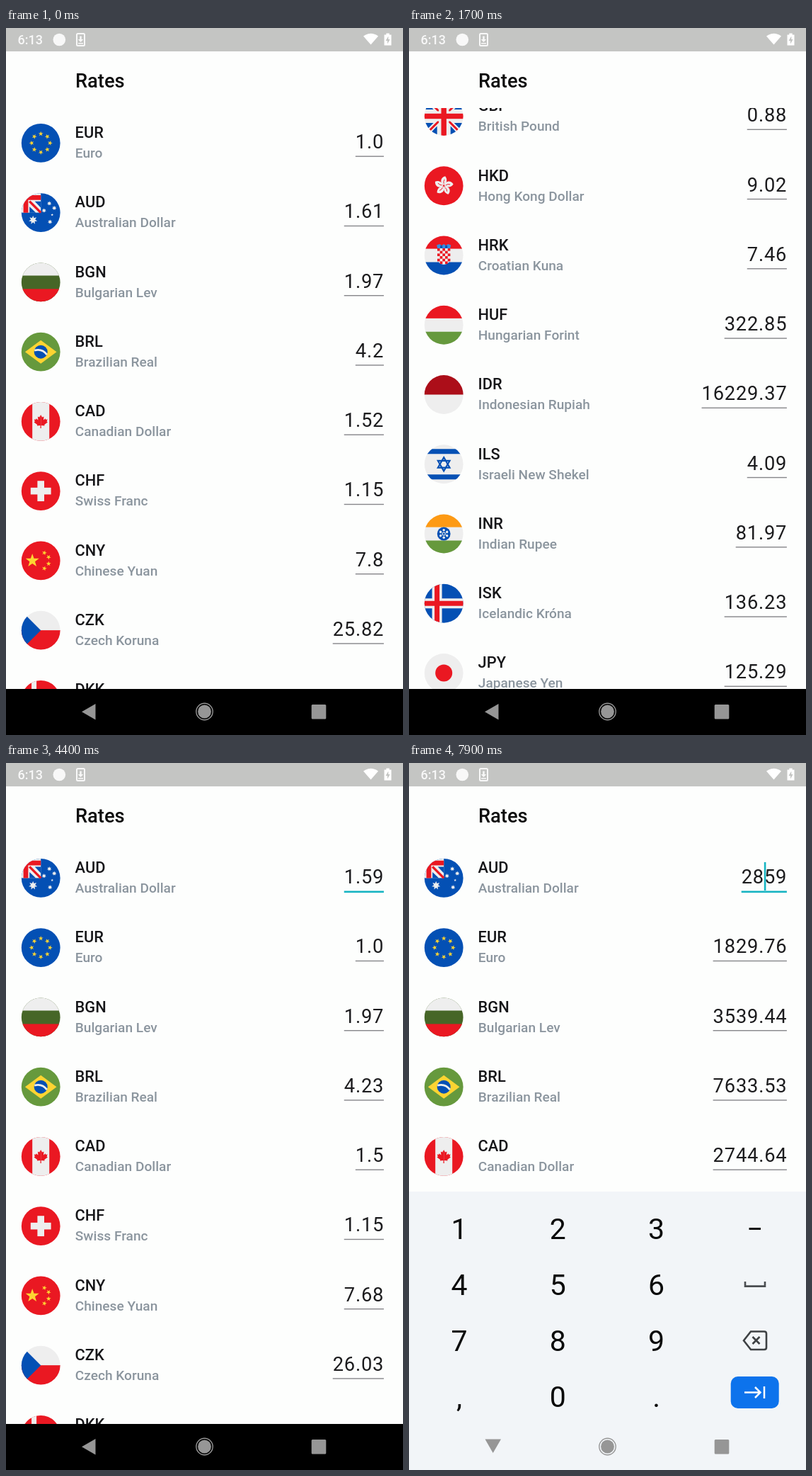
Recreate the animation shown at these times as an HTML page. Size 561 px wide and 998 px high, loop 8000 ms.

```html
<!DOCTYPE html>
<html lang="en">
<head>
<meta charset="utf-8">
<title>Rates</title>
<style>
  html, body { margin: 0; width: 100%; height: 100%; overflow: hidden; background: #fdfefd; }
  svg { display: block; width: 561px; height: 998px; font-family: Roboto, sans-serif; }
  .title { font-size: 27.3px; font-weight: 500; fill: #0c0c0c; }
  .code { font-size: 21.8px; font-weight: 500; fill: #161619; }
  .name { font-size: 19.1px; font-weight: 500; fill: #8b959e; }
  .value { font-size: 27.27px; letter-spacing: .03em; fill: #1c1c1e; }
  .clock { font-size: 18px; font-weight: 500; fill: #f8f8f8; }
  .key { font-size: 41px; text-anchor: middle; fill: #0a0a0a; }
</style>
</head>
<body>
<svg id="stage" viewBox="0 0 561 998"></svg>
<script>
const LOOP = 8000, STEP = 100;
const PITCH = 98.25, FIRST = 162.4, RIGHT = 533.9;
const RED = '#ea1822', BLUE = '#0450b4', WHITE = '#eeeeee', YELLOW = '#fdd432', GREEN = '#66993d';

// Flag helpers: each flag is drawn around 0,0 and clipped to a disc of radius 27.4.
const rect = (x, y, w, h, c) => `<rect x="${x}" y="${y}" width="${w}" height="${h}" fill="${c}"/>`;
const circle = (x, y, r, c) => `<circle cx="${x}" cy="${y}" r="${r}" fill="${c}"/>`;
const path = (d, c, more = '') => `<path d="${d}" fill="${c}" ${more}/>`;
const line = (d, c, w) => path(d, 'none', `stroke="${c}" stroke-width="${w}"`);
const fill = c => rect(-28, -28, 56, 56, c);
const bands = (a, b, c) => fill(b) + rect(-28, -28, 56, 18.6, a) + rect(-28, 9.5, 56, 19, c);
const cross = (x, half, c) => rect(x - half, -28, half * 2, 56, c) + rect(-28, -half, 56, half * 2, c);
const spin = (n, draw) => Array.from({ length: n }, (_, i) =>
  `<g transform="rotate(${i * 360 / n})">${draw(i)}</g>`).join('');

function star(x, y, r, c, points = 5, inner = .4, turn = 0) {
  const pts = [];
  for (let i = 0; i < points * 2; i++) {
    const a = (i / points - .5) * Math.PI + turn, k = i % 2 ? r * inner : r;
    pts.push((x + k * Math.cos(a)).toFixed(2) + ',' + (y + k * Math.sin(a)).toFixed(2));
  }
  return `<polygon points="${pts.join(' ')}" fill="${c}"/>`;
}

function leaf() {
  const half = path('M0-9.5 2.1-5.8 4.3-7 3.8-2 6.4-4.2 7-2.6 9.4-3 8.4 0 9.7 1 5 4.6 5.4 6.2.7 5.7V9.5H0Z', RED);
  return half + `<g transform="scale(-1 1)">${half}</g>`;
}

function shield() {
  let s = path('M-9.2-10H9.2V4A9.2 9 0 0 1-9.2 4Z', WHITE);
  for (let r = 0; r < 6; r++)
    for (let c = 0; c < 5; c++)
      if ((r + c) % 2 === 0 && !(r > 4 && c % 4 === 0))
        s += rect(-9.2 + c * 3.68, -10 + r * 3.68, 3.68, 3.68, RED);
  return s + path('M-9-10-10-14.5-6-16-3-14 0-16 3-14 6-16 10-14.5 9-10Z', '#3a8fe0') +
    rect(-5, -14, 3, 4, BLUE) + rect(2, -14, 3, 4, BLUE);
}

const jack = fill(WHITE) +
  spin(2, () => path('M-9.5-28V-14L-23-28ZM9.5-28V-14L23-28ZM-28-9.5H-14.5L-28-23ZM28-9.5H14.5L28-23Z', BLUE) +
    line('M-7-7-22-22M7-7 22-22', RED, 3)) + cross(0, 7, WHITE) + cross(0, 3.7, RED);

const canton = rect(-28, -28, 28, 28, WHITE) +
  path('M0-16V-7L-8.5-16ZM-16 0H-7L-16-8.5Z', BLUE) + line('M-16-16 0 0', RED, 3.4) +
  path('M-28-24.6H0V-17.8H-17.8V0H-24.6V-28Z', RED);

const trigram = i => [-17, -14, -11].map(y =>
  i === 0 ? rect(-4.6, y - 2.5, 9.2, 1.9, '#111')
    : rect(-4.6, y - 2.5, 4.1, 1.9, '#111') + rect(.5, y - 2.5, 4.1, 1.9, '#111')).join('');

const rows = [
  ['EUR', 'Euro', fill(BLUE) + spin(8, () => star(0, -13, 3.6, YELLOW))],
  ['AUD', 'Australian Dollar', fill(BLUE) + canton + star(-11, 10.5, 6.2, WHITE, 7, .5) +
    star(12, -13, 3.3, WHITE, 7, .5) + star(4.5, -3, 3.3, WHITE, 7, .5) + star(19, -6.5, 3.3, WHITE, 7, .5) +
    star(13, 13, 3.3, WHITE, 7, .5) + star(16, 3, 2, WHITE)],
  ['BGN', 'Bulgarian Lev', bands(WHITE, '#466627', RED)],
  ['BRL', 'Brazilian Real', fill(GREEN) + path('M-22.3 0 0-16.5 22.3 0 0 16.5Z', YELLOW) +
    circle(0, 0, 9.5, BLUE) + line('M-9-2Q2-5 8.6 4', WHITE, 2.8)],
  ['CAD', 'Canadian Dollar', fill(RED) + rect(-12, -28, 24, 56, WHITE) + leaf()],
  ['CHF', 'Swiss Franc', fill(RED) + rect(-14.4, -4.8, 28.8, 9.6, WHITE) + rect(-4.8, -14.4, 9.6, 28.8, WHITE)],
  ['CNY', 'Chinese Yuan', fill(RED) + star(-12, 0, 10, YELLOW) + star(5, -11, 3.6, YELLOW, 5, .4, .3) +
    star(11, -5, 3.6, YELLOW, 5, .4, .6) + star(11, 4.3, 3.6, YELLOW) + star(5, 11, 3.6, YELLOW, 5, .4, .3)],
  ['CZK', 'Czech Koruna', fill(WHITE) + rect(-28, 0, 56, 28, RED) + path('M-28-28 0 0-28 28Z', BLUE)],
  ['DKK', 'Danish Krone', fill(RED) + cross(-9.6, 3.5, WHITE)],
  ['GBP', 'British Pound', jack],
  ['HKD', 'Hong Kong Dollar', fill(RED) + spin(5, () => path('M0-1C-6-4-5-12 2-13.5C5-10 5-4 0-1Z', WHITE) +
    line('M0-3Q-1-6 1-9', RED, .9))],
  ['HRK', 'Croatian Kuna', bands(RED, WHITE, BLUE) + shield()],
  ['HUF', 'Hungarian Forint', bands(RED, WHITE, GREEN)],
  ['IDR', 'Indonesian Rupiah', fill(WHITE) + rect(-28, -28, 56, 28, '#ac0e19')],
  ['ILS', 'Israeli New Shekel', fill(WHITE) + rect(-28, -21.5, 56, 7, BLUE) + rect(-28, 14.5, 56, 7, BLUE) +
    spin(2, () => line('M0-9.6 8.3 4.8H-8.3Z', BLUE, 2.2))],
  ['INR', 'Indian Rupee', bands('#fd9a14', WHITE, GREEN) + circle(0, 0, 9.4, BLUE) +
    spin(6, () => circle(0, -5.2, 1.7, WHITE)) + circle(0, 0, 2.6, WHITE) + circle(0, 0, 1.6, BLUE)],
  ['ISK', 'Icelandic Króna', fill(BLUE) + cross(-9.6, 7, WHITE) + cross(-9.6, 3.5, RED)],
  ['JPY', 'Japanese Yen', fill(WHITE) + circle(0, 0, 12, RED)],
  ['KRW', 'South Korean Won', fill(WHITE) + circle(0, 0, 9.6, RED) + path('M-9.6 0A9.6 9.6 0 0 0 9.6 0Q5-5 0 0T-9.6 0Z', BLUE) +
    `<g transform="rotate(-45)">${spin(4, trigram)}</g>`]
];

// Rate updates: time, first row, values from that row on.
const updates = [
  [0, 0, '1.0 1.61 1.97 4.2 1.52 1.15 7.8 25.82'],
  [1300, 6, '7.74 26.03 7.5 0.88 9.02 7.46 322.85 16229.37 4.09'],
  [2200, 0, '1.0 1.61 1.99 4.25 1.51 1.16 7.68 26.05 7.52 0.89'],
  [2200, 10, '8.98 7.53 319.34 16255.38 4.1 81.97 136.23 125.29 1288.43'],
  [3300, 0, '1.0 1.59 1.98 4.22 1.52 1.16 7.71 25.94'],
  [4400, 0, '1.0 1.59 1.97 4.23 1.5 1.15 7.68 26.03'],
  [5300, 0, '1.01 1.59 2.0 4.26 1.52 1.16'],
  [5700, 1, '159'], [5900, 1, '59'],
  [6400, 0, '37.61 259 72.89 157.45 56.71'],
  [6700, 1, '2859'],
  [7300, 0, '1822.41 2859 3551.27 7658.9 2731.85'],
  [7800, 0, '1829.76 2859 3539.44 7633.53 2744.64']
].map(([time, first, list]) => ({ time, first, list: list.split(' ') }));

const scrollKeys = [[300, 0], [400, 50], [500, 190], [600, 300], [700, 352], [800, 386], [900, 408],
  [1000, 424], [1100, 440], [1200, 540], [1300, 653]];
const returnKeys = [[2200, 996.7], [2300, 800], [2400, 520], [2500, 220], [2600, 0]];
const glowKeys = [[2500, 0], [2600, .7], [2700, 1], [2800, .8], [2900, .55], [3000, .28], [3100, 0]];
const swapKeys = [[3800, 0], [3900, .16], [4000, .62], [4100, .95], [4200, 1]];
const sheetKeys = [[4700, 393], [4800, 250], [4900, 110], [5000, 36], [5100, 8], [5200, 0]];

// Touches: start, end, then x,y at both.
const touches = [
  [400, 600, 470, 690, 482, 440], [1100, 1300, 468, 480, 475, 267], [2200, 2400, 428, 217, 440, 694],
  [3800, 3900, 500, 266, 500, 266], [4700, 4800, 505, 166, 505, 166],
  [5700, 5900, 488, 815, 488, 815], [6400, 6500, 212, 660, 212, 660], [6700, 6800, 212, 817, 212, 817]
];

function along(keys, t) {
  if (t <= keys[0][0]) return keys[0][1];
  for (let i = 1; i < keys.length; i++) {
    const [t0, a] = keys[i - 1], [t1, b] = keys[i];
    if (t < t1) return a + (b - a) * (t - t0) / (t1 - t0);
  }
  return keys[keys.length - 1][1];
}

function scrollAt(t) {
  if (t <= 1300) return along(scrollKeys, t);
  if (t >= 2200) return along(returnKeys, t);
  const u = (t - 1300) / 900;
  return 653 + 343.7 * (1 - (1 - u) ** 2.6);
}

function valueAt(row, t) {
  const known = updates.filter(u => u.list[row - u.first] !== undefined);
  const now = known.filter(u => u.time <= t).pop() || known[0];
  return now.list[row - now.first];
}

const textWidth = s => [...s].reduce((w, ch) => w + (ch === '.' ? 8 : 16.05), 0);

const rowMarkup = rows.map(([code, name, flag]) => `<g class="row">
  <g transform="translate(49.2 0)" clip-path="url(#disc)">${flag}</g>
  <text class="code" x="97.6" y="-7.2">${code}</text>
  <text class="name" x="97.8" y="20.8">${name}</text>
  <text class="value" y="7.8"></text><rect class="rule" y="18.1"/></g>`).join('');

const digit = (s, i) => `<text class="key" x="${71 + i % 3 * 139.3}" y="${671.5 + Math.floor(i / 3) * 79}">${s}</text>`;

const keyboard = rect(0, 605, 561, 400, '#f2f5f8') + [...'123456789,0.'].map(digit).join('') +
  rect(480.5, 656, 16.5, 3, '#111') + line('M475 732V738.6H503V732', '#4a4d50', 2.6) +
  line('M483 802.5H502Q505 802.5 505 805.5V825Q505 828 502 828H483L473 815.2Z', '#3e4144', 2.6) +
  line('M485.5 810 495.5 820M495.5 810 485.5 820', '#3e4144', 2.6) +
  `<rect x="454.7" y="866" width="68" height="45" rx="10" fill="#0d73ec"/>` +
  line('M474 888.5H496M489 881 496.5 888.5 489 896M502 880V897', '#fff', 2.5);

const stage = document.getElementById('stage');
stage.innerHTML = `<defs>
  <clipPath id="disc"><circle r="27.4"/></clipPath>
  <clipPath id="list"><rect y="113" width="561" height="820"/></clipPath></defs>
  ${rect(0, 0, 561, 998, '#fdfefd')}
  <g clip-path="url(#list)">${rowMarkup}
    <rect id="caret" x="501.8" y="140" width="2.6" height="40" fill="#16b4c2"/>
    <path id="glow" d="M0 0H561V29A663 663 0 0 1 0 29Z" fill="#5514f0"/></g>
  <text class="title" x="98" y="83.6">Rates</text>
  ${rect(0, 0, 561, 33, '#c4c5c3')}
  <text class="clock" x="16.5" y="23.3">6:13</text>
  ${circle(75.3, 16.5, 8.8, '#f8f8f8')}
  <rect x="100" y="8" width="11" height="17" rx="1.5" fill="none" stroke="#f8f8f8" stroke-width="2"/>
  ${path('M104.3 11.5H106.7V16H109.3L105.5 20 101.7 16H104.3ZM102 21H109V22.4H102Z', '#f8f8f8')}
  ${path('M515.5 23.5 505 11.5Q515.5 4 526 11.5Z', '#fff')}
  ${path('M534.5 9.5H537.3V7.6H541.7V9.5H544.5V24.5H534.5Z', '#fff')}
  ${path('M540.3 11.5 536.5 18H539V22.5L542.6 16H540.3Z', '#c4c5c3')}
  <rect id="nav" y="933" width="561" height="65"/>
  <g id="sheet">${keyboard}</g>
  <path id="back" fill="#969696"/>
  ${circle(280.5, 965, 9.4, '#969696')}
  <circle cx="280.5" cy="965" r="11.7" fill="none" stroke="#969696" stroke-width="1.4"/>
  <rect x="431.7" y="955" width="20.6" height="20.6" rx="1.5" fill="#969696"/>
  <circle id="touch" r="15.5" fill="#fff" fill-opacity=".6" stroke="#cdd1ea" stroke-width="2"/>`;

const pick = id => document.getElementById(id);
const caret = pick('caret'), glow = pick('glow'), nav = pick('nav'), sheet = pick('sheet');
const back = pick('back'), touch = pick('touch');
const rowParts = [...stage.querySelectorAll('.row')].map(g => ({
  g, text: g.querySelector('.value'), rule: g.querySelector('.rule')
}));
const set = (el, attrs) => { for (const k in attrs) el.setAttribute(k, attrs[k]); };
const show = (el, on) => set(el, { visibility: on ? 'visible' : 'hidden' });

function render(t) {
  const scroll = scrollAt(t), swap = along(swapKeys, t);
  rowParts.forEach(({ g, text, rule }, i) => {
    const slot = i === 0 ? swap : i === 1 ? 1 - swap : i;
    const value = valueAt(i, t), width = textWidth(value), focus = i === 1 && t >= 4000;
    set(g, { transform: `translate(0 ${FIRST + slot * PITCH - scroll})` });
    if (text.textContent !== value) text.textContent = value;
    set(text, { x: RIGHT - width });
    set(rule, { x: RIGHT - width, width, height: focus ? 2.6 : 1.4, fill: focus ? '#16b4c2' : '#86868a' });
  });

  const shine = along(glowKeys, t);
  set(glow, { transform: `translate(0 113) scale(1 ${shine})`, 'fill-opacity': .147 * Math.min(1, shine * 1.2) });

  const typing = t >= 4800;
  set(nav, { fill: typing ? '#f2f5f8' : '#000' });
  set(sheet, { transform: `translate(0 ${along(sheetKeys, t)})` });
  show(sheet, typing);
  set(back, { d: typing ? 'M107.5 954.5H130L118.7 974Z' : 'M107 965.3 126.5 954V976.6Z' });
  show(caret, t >= 4700 && t < 5200 || t >= 5700 && t < 7200 || t >= 7700);

  const hit = touches.find(([a, b]) => t >= a && t <= b);
  show(touch, !!hit);
  if (hit) {
    const [a, b, x0, y0, x1, y1] = hit, u = (t - a) / (b - a);
    set(touch, { cx: x0 + (x1 - x0) * u, cy: y0 + (y1 - y0) * u });
  }
}

let start = null;
function tick(now) {
  if (start === null) start = now;
  render(Math.floor(((now - start + 5) % LOOP) / STEP) * STEP);
  requestAnimationFrame(tick);
}
render(0);
requestAnimationFrame(tick);
</script>
</body>
</html>
```
